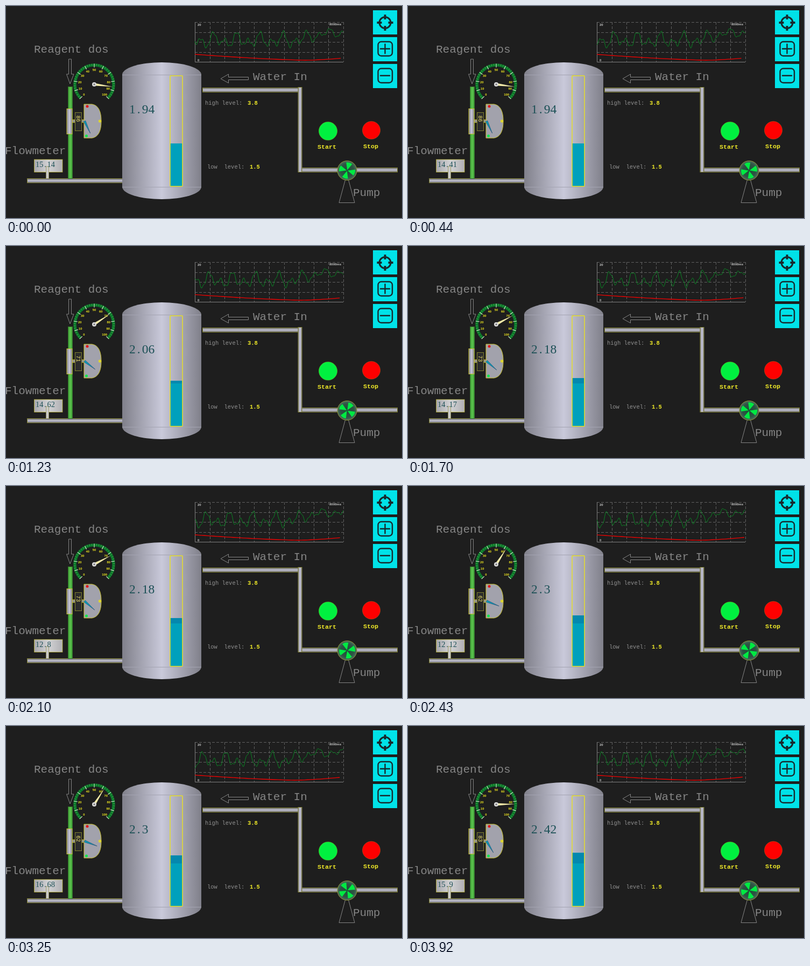
Recreate the animation shown at these times as an HTML page. Size 736 px wide and 395 px high, loop 3.99 s.

```html
<!DOCTYPE html>
<html lang="en">
<head>
<meta charset="utf-8">
<title>Water tank monitor</title>
<style>
html, body { margin: 0; width: 100%; height: 100%; overflow: hidden; background: #1e1e1e; }
svg { display: block; width: 736px; height: 395px; }
text { font-family: "Liberation Mono", "DejaVu Sans Mono", monospace; white-space: pre; }
.title { font-size: 21px; fill: #858585; }
.note { font-size: 10.5px; fill: #909090; }
.limit { font-size: 10.5px; font-weight: bold; fill: #f0ea28; }
.name { font-size: 11.7px; font-weight: bold; fill: #f0ea28; }
.value { font-family: "Liberation Serif", "Times New Roman", serif; fill: #1c5056; }
.tiny { font: bold 6px "Liberation Sans", Arial, sans-serif; fill: #c4c4c4; }
.dial { font: bold 5.8px "Liberation Sans", Arial, sans-serif; fill: #f0e820; text-anchor: middle; }
.edge { stroke: #80802e; stroke-width: 1; }
.trim { stroke: #c8c02c; stroke-width: 1; }
.line { fill: none; stroke: #858585; stroke-width: 1; }
.icon { fill: none; stroke: #18282c; stroke-width: 2.4; stroke-linecap: round; }
</style>
</head>
<body>
<svg viewBox="0 0 736 395">
  <defs>
    <linearGradient id="steel">
      <stop offset="0" stop-color="#80808a"/><stop offset=".5" stop-color="#c9c9da"/><stop offset="1" stop-color="#80808a"/>
    </linearGradient>
    <linearGradient id="across" x2="0" y2="1">
      <stop offset="0" stop-color="#66666e"/><stop offset=".5" stop-color="#c4c4d2"/><stop offset="1" stop-color="#66666e"/>
    </linearGradient>
    <linearGradient id="green">
      <stop offset="0" stop-color="#3c9c34"/><stop offset=".5" stop-color="#5cc44e"/><stop offset="1" stop-color="#3c9c34"/>
    </linearGradient>
    <linearGradient id="plate">
      <stop offset="0" stop-color="#a8a8ae"/><stop offset=".5" stop-color="#d2d2d4"/><stop offset="1" stop-color="#b0b0b4"/>
    </linearGradient>
    <radialGradient id="casing">
      <stop offset="0" stop-color="#1c5036"/><stop offset=".7" stop-color="#2e5444"/><stop offset="1" stop-color="#4c6c5c"/>
    </radialGradient>
    <clipPath id="plot"><rect x="351" y="28" width="276" height="78"/></clipPath>
  </defs>

  <g id="buttons" fill="#00e2e8">
    <rect x="682" y="8" width="45" height="45"/>
    <rect x="682" y="58" width="45" height="45"/>
    <rect x="682" y="108" width="45" height="45"/>
    <g class="icon">
      <circle cx="704.5" cy="31" r="10.5" stroke-width="3"/>
      <path d="M704.5 16v9M704.5 37v9M689.5 31h9M710.5 31h9" stroke-width="3.8" stroke-linecap="butt"/>
      <rect x="691.5" y="66.500" width="26.500" height="26.500" rx="6"/>
      <path d="M696 79.800h17M704.500 71.300v17"/>
      <rect x="691.5" y="116.500" width="26.500" height="26.500" rx="6"/>
      <path d="M696 129.800h17"/>
    </g>
  </g>

  <g id="chart">
    <path id="grid" fill="none" stroke="#606060" stroke-dasharray="5 3"/>
    <path d="M351.5 30V104.5H627" fill="none" stroke="#808080"/>
    <g clip-path="url(#plot)" fill="none">
      <path id="wave" stroke="#0a8424"/>
      <path id="trend" stroke="#f00000" stroke-width="1.3"/>
    </g>
    <text class="tiny" x="356" y="36.500">20</text>
    <text class="tiny" x="356" y="102.500">0</text>
    <text class="tiny" x="601" y="36">8000ms</text>
  </g>

  <text class="title" x="52" y="87">Reagent dos</text>
  <text class="title" x="459" y="138">Water In</text>
  <text class="title" x="-2" y="276">Flowmeter</text>
  <text class="title" x="645" y="353.500">Pump</text>
  <path class="line" d="M116.500 99h5v28h4.500l-7 18-6.500-18h4z"/>
  <path class="line" d="M399 135.500l14.500-8.500v5.500h37v5h-37v6z"/>

  <g id="pipes" class="edge">
    <rect x="39.5" y="321.5" width="178" height="8" fill="url(#across)"/>
    <rect x="115.5" y="150.5" width="8" height="171" fill="url(#green)" stroke="#34722c"/>
    <rect x="365.5" y="152.5" width="180" height="8" fill="url(#across)"/>
    <rect x="545.5" y="301.5" width="182" height="8" fill="url(#across)"/>
    <rect x="543" y="151.5" width="7" height="158" fill="url(#steel)"/>
  </g>

  <g id="tank">
    <path d="M216 128A73.500 23 0 0 1 363 128V337A73.500 23 0 0 1 216 337Z" fill="url(#steel)"/>
    <path d="M216 128.500H363M216 337.500H363" stroke="#a4a4b2" fill="none"/>
    <rect id="fill" x="305" width="23" fill="#00a0bc"/>
    <rect id="rise" x="306" width="21" fill="#0488ae"/>
    <rect x="305" y="130" width="23" height="206" rx="1" fill="none" stroke="#e6de28" stroke-width="1.5"/>
    <text id="level" class="value" x="229" y="199.500" dx="0 3 3" font-size="23.5"></text>
  </g>
  <text class="note" x="370" y="184">high level:</text>
  <text class="limit" x="449" y="184">3.8</text>
  <text class="note" x="374" y="303">low  level:</text>
  <text class="limit" x="453" y="303">1.5</text>

  <g id="dial" transform="translate(164 146)">
    <path d="M-25.5 25.5A36 36 0 1 1 25.5 25.5" fill="none" stroke="#0a782a" stroke-width="5.5"/>
    <g id="ticks"></g>
    <path id="needle" d="M-2.6 3L0 -35 2.6 3Z" fill="#f2eaa8"/>
    <circle r="4" fill="#d8d8d8"/><circle r="1.5" fill="#6c6c6c"/>
  </g>

  <g id="valve">
    <rect class="trim" x="123" y="212" width="23" height="5" fill="#8c8c94"/>
    <rect class="trim" x="113" y="191.5" width="10" height="47" fill="url(#steel)"/>
    <rect class="edge" x="128.5" y="198.5" width="12" height="34" fill="#2c2c2c"/>
    <text id="opening" transform="translate(131.3 204) rotate(90)" font-size="10" fill="#f0e468"></text>
    <path class="trim" d="M145 183H160Q177 186 177 214.500T160 246H145Z" fill="#a2a2ac"/>
    <circle cx="151" cy="187" r="2.5" fill="#e01414"/>
    <circle cx="149.5" cy="242" r="2.5" fill="#10e848"/>
    <circle cx="174.5" cy="214.5" r="2.7" fill="#dcd434"/>
    <path id="hand" d="M0 -2L25 0 0 2Z" fill="#0898b4" stroke="#244c74" stroke-width=".6"/>
  </g>

  <g id="meter">
    <rect class="trim" x="52.5" y="286" width="52.500" height="23.500" fill="url(#plate)" stroke-opacity=".7"/>
    <rect x="74.5" y="299" width="5" height="22.500" fill="#cacac8" stroke="#98945c" stroke-width=".8"/>
    <text id="flow" class="value" x="55" y="300" dx="0 0 1.8 1.8" font-size="14.4"></text>
  </g>

  <circle cx="598.5" cy="233" r="17" fill="#00f040" stroke="#5cc828" stroke-width=".7"/>
  <circle cx="679" cy="231.5" r="16.500" fill="#ff0000" stroke="#c84818" stroke-width=".7"/>
  <text class="name" x="579" y="265.500">Start</text>
  <text class="name" x="664" y="265">Stop</text>

  <path class="line" d="M633.5 313L619 366.500H648Z"/>
  <circle cx="634" cy="306.5" r="18" fill="url(#casing)" stroke="#8c9434"/>
  <g id="fan" fill="#00ea42"></g>
</svg>

<script>
const LOOP = 3990;
const STROKE = 196.5; // two screen refreshes
const OPENING = [86, 71, 73, 62, 83];
const FLOW_KEYS = [[0, 15.14], [3, 14.05], [5, 14.62], [6, 14.17], [9, 12.12], [11, 16.68], [14, 15.9]];

const $ = id => document.getElementById(id);
const set = (id, attrs) => Object.entries(attrs).forEach(([k, v]) => $(id).setAttribute(k, v));
const wave = (x, peak, length) => Math.cos((x - peak) / length * 2 * Math.PI);

function between(keys, x) {
  const i = Math.max(1, keys.findIndex(k => k[0] >= x));
  const [[x0, y0], [x1, y1]] = [keys[i - 1], keys[i]];
  return y0 + (y1 - y0) * (x - x0) / (x1 - x0);
}

// Flow signal: two beating waves and a ripple, rising and calming late on
function signal(x) {
  const p = Math.min(1, Math.max(0, (x - 530) / 75));
  const late = p * p * (3 - 2 * p);
  const swing = 9 * wave(x, 363, 21.8) + 7 * wave(x, 430, 42) + 3 * wave(x, 383, 8.3);
  return 64 - 14 * late - swing * (1 - .45 * late);
}

// Level history: long fall, then a short recovery
const history = x => x < 558
  ? 101 - 11 * ((558 - x) / 207) ** 1.4
  : 101 - 3.6 * ((x - 558) / 64) ** 1.5;

function plot(fn, from, to, gap) {
  let d = '';
  for (let x = from; x <= to; x += gap) d += `${d ? 'L' : 'M'}${x} ${fn(x).toFixed(2)}`;
  return d;
}

function build() {
  let grid = '';
  for (let i = 1; i <= 10; i++) grid += `M${Math.round(351 + i * 27.6) + .5} 30V104`;
  for (let i = 0; i < 4; i++) grid += `M351 ${Math.round(30 + i * 18.7) + .5}H627`;
  set('grid', { d: grid });
  set('wave', { d: plot(signal, 345, 660, 1.5) });

  let ticks = '';
  for (let v = 0; v <= 100; v += 2.5) {
    const major = v % 10 === 0;
    const turn = v * 2.7 - 135;
    ticks += `<path d="M0 -38.5V${major ? -31.5 : -35}" transform="rotate(${turn})"
      stroke="${major ? '#e4ecd4' : '#6cac5c'}" stroke-width="${major ? 1.1 : .6}"/>`;
    if (major) {
      const a = turn * Math.PI / 180;
      ticks += `<text class="dial" x="${Math.sin(a) * 27}" y="${2 - Math.cos(a) * 27}">${v}</text>`;
    }
  }
  $('ticks').innerHTML = ticks;
  $('fan').innerHTML = [0, 90, 180, 270].map(a =>
    `<path d="M0 -1L-5.5 -14Q0 -16.5 6 -13.5Z" transform="rotate(${a})"/>`).join('');
}

// Refreshes come in pairs: a short hold, then one twice as long
function stepAt(t) {
  const p = (t - 50) / STROKE;
  const pair = Math.floor(p);
  return 1 + 2 * pair + (p - pair > .32 ? 1 : 0);
}

function show(step) {
  const reading = Math.floor((step + 5) / 10);
  const level = 1.94 + reading * .12;
  const top = 336 - level * 41.2;
  const opening = OPENING[reading];
  const shift = step * .61;

  $('level').textContent = +level.toFixed(2);
  set('fill', { y: top, height: 336 - top });
  set('rise', { y: top, height: reading * .12 * 41.2 });

  $('opening').textContent = opening;
  set('needle', { transform: `rotate(${opening * 2.7 - 135})` });
  set('hand', { transform: `translate(146 214.5) rotate(${(opening - 50) * 1.8})` });
  $('flow').textContent = +between(FLOW_KEYS, Math.ceil(step / 3)).toFixed(2);
  set('fan', { transform: `translate(634 306.5) rotate(${15 + step * 15})` });

  set('wave', { transform: `translate(${-shift} 0)` });
  const end = 622 + reading * 6.1;
  set('trend', { d: plot(history, end - 300, end, 6), transform: `translate(${-shift} 0)` });
}

build();
const start = performance.now();
let current;
function frame() {
  const step = stepAt((performance.now() - start) % LOOP);
  if (step !== current) show(current = step);
  requestAnimationFrame(frame);
}
frame();
</script>
</body>
</html>
```
